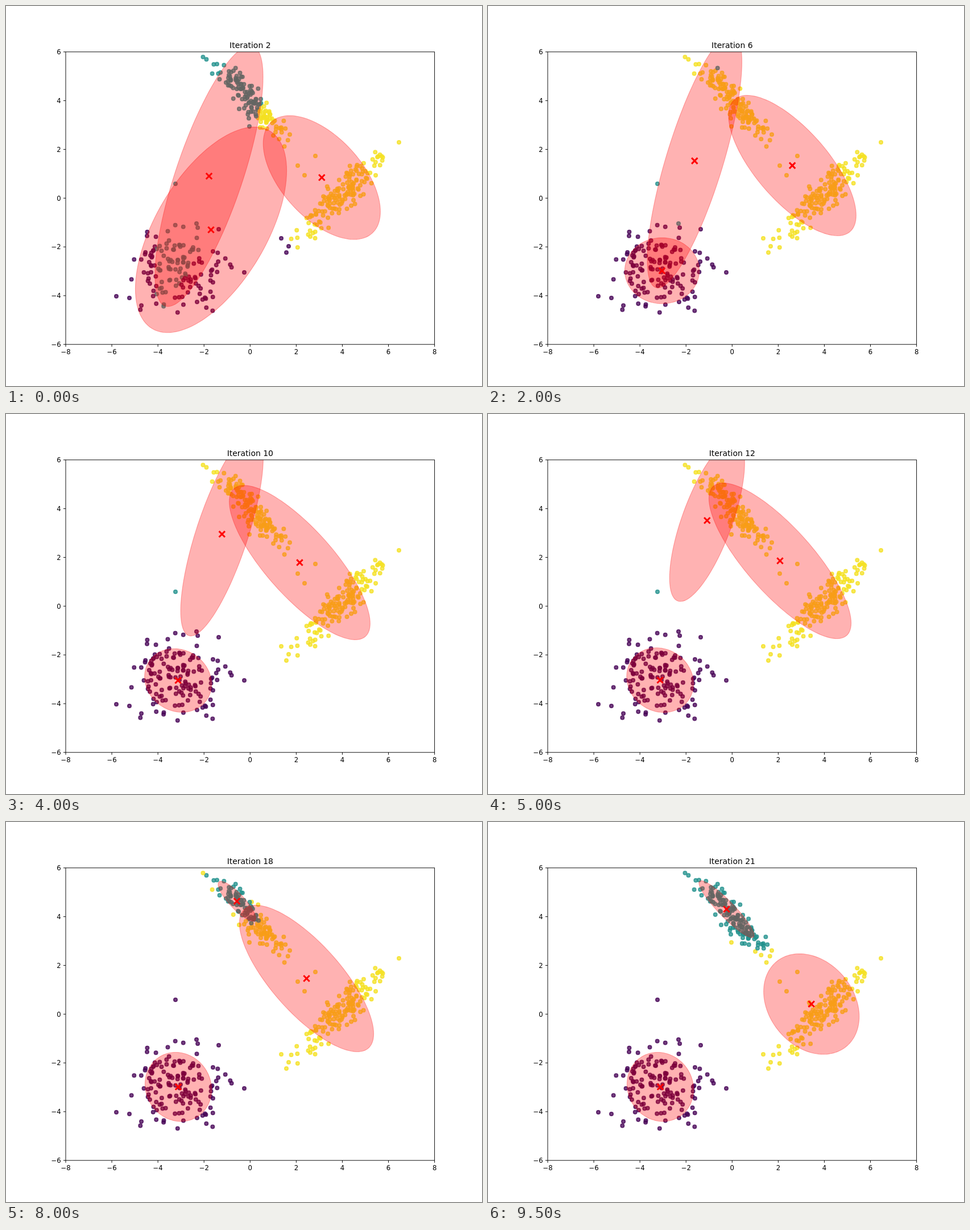
These frames come from a looping animation (837 by 669 pixels, 10 s). An HTML page with a canvas:

```html
<!DOCTYPE html>
<html lang="en">
<head>
<meta charset="utf-8">
<title>Gaussian mixture iterations</title>
<style>
  html, body { margin: 0; width: 100%; height: 100%; overflow: hidden; background: #fff; }
  canvas { display: block; }
</style>
</head>
<body>
<canvas id="stage" width="837" height="669"></canvas>
<script>
const ctx = document.getElementById('stage').getContext('2d');
const box = { x: 105, y: 80.8, w: 648.6, h: 515 };
const FONT = '"DejaVu Sans", sans-serif';
const STEP = 500, FIRST = 2, COUNT = 20;

// The middle component nearly vanishes before it recovers
const tealWeight = it => .03 + .3 * ((it - 13.5) / 11.5) ** 2;

// Keys: iteration, centre x, centre y, half width, half height, correlation
const clusters = [
  { color: 'rgb(68,1,84)', weight: () => .3, keys: [
    [2, 360.5, 394, 133, 181, -.575],
    [4, 324, 440, 97.7, 131, -.5],
    [6, 306, 466, 65.5, 58, 0],
    [8, 302.5, 469.3, 59, 55.5, .12],
    [18, 303, 466.3, 58.5, 60.8, .08]] },
  { color: 'rgb(33,145,140)', weight: tealWeight, keys: [
    [2, 357, 299.5, 95, 229.5, -.76],
    [4, 356, 297, 88.5, 232, -.78],
    [8, 374, 237, 78, 206, -.775],
    [12, 385.3, 187.5, 66, 142.5, -.71],
    [15, 396.4, 152, 48, 71, -.57],
    [18, 406, 139.5, 33, 35, .85],
    [21, 419.5, 153.5, 48.5, 50, .92]] },
  { color: 'rgb(244,225,32)', weight: it => .7 - tealWeight(it), keys: [
    [2, 555.3, 302, 103, 109, .55],
    [4, 548.5, 294.7, 104, 113, .63],
    [8, 522.8, 268.2, 121, 133, .765],
    [12, 513.5, 258.5, 125, 137, .8],
    [15, 513.5, 258.5, 125, 137, .8],
    [18, 528.5, 275.5, 118, 129, .755],
    [21, 568.7, 320.5, 84, 88.5, .25]] }
];

function makeRandom(seed) {
  return () => {
    seed = (seed + 0x6D2B79F5) | 0;
    let t = Math.imul(seed ^ (seed >>> 15), 1 | seed);
    t = (t + Math.imul(t ^ (t >>> 7), 61 | t)) ^ t;
    return ((t ^ (t >>> 14)) >>> 0) / 4294967296;
  };
}

// A few stray samples; the rest are random
const points = [
  [298, 313], [335, 383], [374, 393], [419, 469], [194, 511], [217, 514],
  [428, 212], [513, 281], [525, 298], [544, 264],
  [691, 240], [484, 409], [497, 423], [493, 434]
];
const random = makeRandom(11);

// Correlated normal samples, cut off at a distance of `limit` deviations
function scatter(n, cx, cy, sx, sy, r, limit) {
  while (n > 0) {
    const d = Math.sqrt(-2 * Math.log(1 - random()));
    const a = 2 * Math.PI * random();
    if (d > limit) continue;
    const u = d * Math.cos(a), v = d * Math.sin(a);
    points.push([cx + sx * u, cy + sy * (r * u + Math.sqrt(1 - r * r) * v)]);
    n--;
  }
}
scatter(144, 303, 466, 41, 43, 0, 2.4);
scatter(146, 430, 166, 40, 44, .92, 2.2);
scatter(146, 588, 335, 39, 43, -.9, 2.3);

// Slope at key i that keeps the curve free of overshoot
function slope(keys, i, k) {
  const rate = j => (keys[j + 1][k] - keys[j][k]) / (keys[j + 1][0] - keys[j][0]);
  if (i === 0) return rate(0);
  if (i === keys.length - 1) return rate(i - 1);
  const a = rate(i - 1), b = rate(i);
  return a * b > 0 ? 2 * a * b / (a + b) : 0;
}

function shapeAt({ keys, weight }, it) {
  const now = Math.min(it, keys[keys.length - 1][0]);
  let i = 0;
  while (i < keys.length - 2 && keys[i + 1][0] <= now) i++;
  const a = keys[i], b = keys[i + 1];
  const span = b[0] - a[0], t = (now - a[0]) / span, s = 1 - t;
  const [, x, y, w, h, r] = a.map((v, k) =>
    v + (b[k] - v) * t * t * (3 - 2 * t)
    + span * t * s * (s * slope(keys, i, k) - t * slope(keys, i + 1, k)));
  return { x, y, w, h, r, weight: weight(it) };
}

function logDensity(s, [px, py]) {
  const dx = (px - s.x) / s.w, dy = (py - s.y) / s.h, q = 1 - s.r * s.r;
  return Math.log(s.weight / (s.w * s.h * Math.sqrt(q)))
    - (dx * dx + dy * dy - 2 * s.r * dx * dy) / q;
}

function drawPoint([x, y], color) {
  ctx.beginPath();
  ctx.arc(x, y, 3.15, 0, 2 * Math.PI);
  ctx.fillStyle = ctx.strokeStyle = color;
  ctx.fill();
  ctx.stroke();
}

function drawEllipse(s) {
  const k = Math.sqrt(1 - s.r * s.r);
  ctx.beginPath();
  for (let i = 0; i < 120; i++) {
    const a = i * Math.PI / 60;
    ctx.lineTo(s.x + s.w * Math.cos(a), s.y + s.h * (s.r * Math.cos(a) + k * Math.sin(a)));
  }
  ctx.closePath();
  ctx.fill();
  ctx.stroke();
}

function line(x1, y1, x2, y2) {
  ctx.beginPath();
  ctx.moveTo(x1, y1);
  ctx.lineTo(x2, y2);
  ctx.stroke();
}

function drawCross({ x, y }) {
  const d = 5.2;
  line(x - d, y - d, x + d, y + d);
  line(x - d, y + d, x + d, y - d);
}

function drawAxes(it) {
  const label = v => String(v).replace('-', '\u2212');
  const bottom = box.y + box.h;
  ctx.strokeStyle = ctx.fillStyle = '#000';
  ctx.lineWidth = .93;
  ctx.strokeRect(box.x, box.y, box.w, box.h);
  ctx.font = '11.62px ' + FONT;
  ctx.textAlign = 'center';
  for (let v = -8; v <= 8; v += 2) {
    const x = box.x + (v + 8) * box.w / 16;
    line(x, bottom, x, bottom + 4.1);
    ctx.fillText(label(v), x, 612.6);
  }
  ctx.textAlign = 'right';
  for (let v = -6; v <= 6; v += 2) {
    const y = bottom - (v + 6) * box.h / 12;
    line(box.x, y, box.x - 4.1, y);
    ctx.fillText(label(v), 96.7, y + 4.3);
  }
  ctx.font = '13.94px ' + FONT;
  ctx.textAlign = 'center';
  ctx.fillText('Iteration ' + it, box.x + box.w / 2, 73.6);
}

function draw(it) {
  const shapes = clusters.map(c => shapeAt(c, it));
  ctx.fillStyle = '#fff';
  ctx.fillRect(0, 0, 837, 669);

  ctx.save();
  ctx.beginPath();
  ctx.rect(box.x, box.y, box.w, box.h);
  ctx.clip();
  ctx.globalAlpha = .75;
  ctx.lineWidth = 1.74;
  for (const p of points) {
    const scores = shapes.map(s => logDensity(s, p));
    drawPoint(p, clusters[scores.indexOf(Math.max(...scores))].color);
  }
  ctx.globalAlpha = .3;
  ctx.lineWidth = 1.16;
  ctx.fillStyle = ctx.strokeStyle = '#f00';
  shapes.forEach(drawEllipse);
  ctx.globalAlpha = 1;
  ctx.lineWidth = 3;
  shapes.forEach(drawCross);
  ctx.restore();

  drawAxes(it);
}

let shown = 0;
const start = performance.now();
function frame() {
  const elapsed = performance.now() - start;
  const it = FIRST + Math.floor(elapsed / STEP) % COUNT;
  if (it !== shown) draw(shown = it);
  requestAnimationFrame(frame);
}
frame();
</script>
</body>
</html>
```
